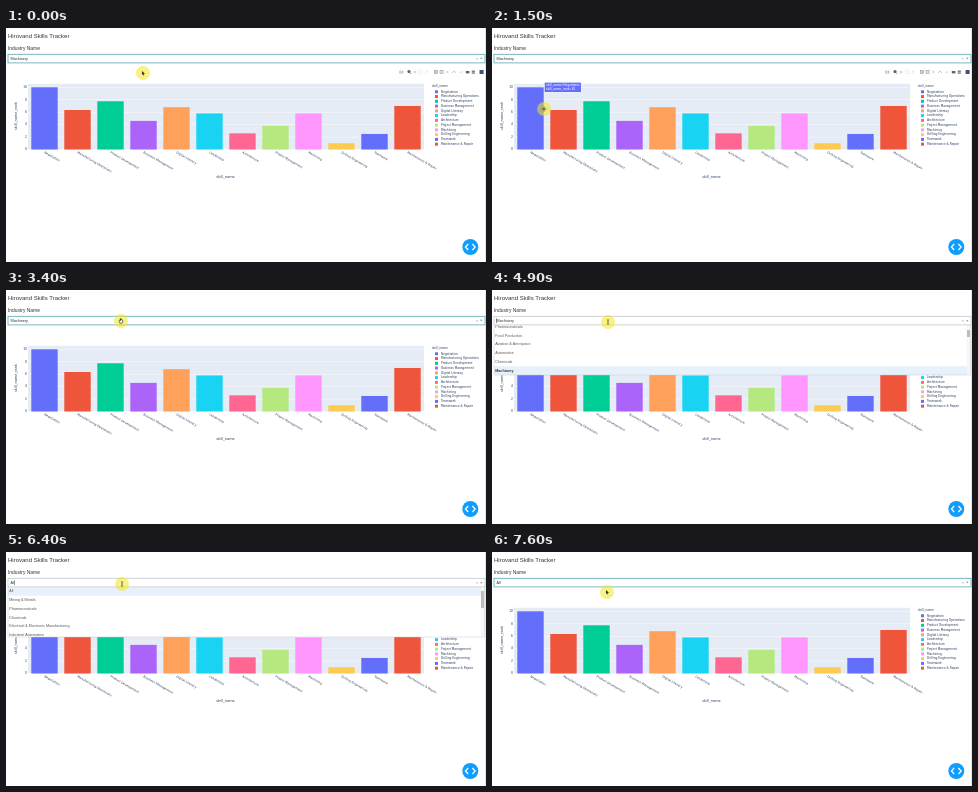
An HTML page with a canvas for the animation above (8 s loop, 480 px wide and 234 px high).

```html
<!DOCTYPE html>
<html lang="en">
<head>
<meta charset="utf-8">
<title>Skills Tracker</title>
<style>
html, body { margin: 0; width: 100%; height: 100%; overflow: hidden; background: #fff; }
canvas { display: block; width: 480px; height: 234px; }
</style>
</head>
<body>
<canvas></canvas>
<script>
const canvas = document.querySelector('canvas');
const g = canvas.getContext('2d');
const ratio = window.devicePixelRatio || 1;
canvas.width = 480 * ratio;
canvas.height = 234 * ratio;

const LOOP = 8000;
const UI = '"Liberation Sans", Arial, sans-serif';
const PLOT = '"DejaVu Sans", Verdana, sans-serif';
const INK = '#2a3f5f';
const COLORS = ['#636efa', '#ef553b', '#00cc96', '#ab63fa', '#ffa15a',
  '#19d3f3', '#ff6692', '#b6e880', '#ff97ff', '#fecb52'];
const SKILLS = [['Negotiation', 10], ['Manufacturing Operations', 6.35],
  ['Product Development', 7.75], ['Business Management', 4.6],
  ['Digital Literacy', 6.8], ['Leadership', 5.8], ['Architecture', 2.6],
  ['Project Management', 3.8], ['Machining', 5.8], ['Drilling Engineering', 1],
  ['Teamwork', 2.5], ['Maintenance & Repair', 7]];
const INDUSTRIES = ['All', 'Mining & Metals', 'Pharmaceuticals', 'Food Production',
  'Aviation & Aerospace', 'Automotive', 'Chemicals', 'Machinery',
  'Electrical & Electronic Manufacturing', 'Industrial Automation', 'Oil & Energy'];

// Pointer path: time, x, y
const PATH = [[0, 137, 45], [250, 128, 53], [550, 92, 70], [900, 56, 79], [1200, 49, 82],
  [1500, 52, 81], [1650, 58, 84], [1800, 73, 90], [2000, 84, 93], [2200, 97, 94],
  [2400, 100, 93], [2700, 104, 91], [2850, 107, 76], [3050, 112, 48], [3300, 115, 31],
  [3700, 115, 31], [4000, 116, 32], [6400, 116, 32], [6800, 117, 39], [7200, 117, 39.5],
  [7400, 115, 40], [8000, 115, 40]];
const OPEN = 3600, CLOSE = 7000;

const barLeft = i => 25.3 + 33 * i;
const BAR_W = 26.4;
const yOf = v => 121.5 - 6.22 * v;
const color = i => COLORS[i % COLORS.length];

function rect(x, y, w, h, fill) {
  g.fillStyle = fill;
  g.fillRect(x, y, w, h);
}

function line(points, stroke, width) {
  g.beginPath();
  points.forEach(([x, y]) => g.lineTo(x, y));
  g.strokeStyle = stroke;
  g.lineWidth = width;
  g.stroke();
}

function disc(x, y, r, fill) {
  g.beginPath();
  g.arc(x, y, r, 0, 7);
  g.fillStyle = fill;
  g.fill();
}

// Drawn enlarged and scaled down so that tiny glyphs keep exact widths
function text(str, x, y, size, { font = UI, fill = '#333', align = 'left', turn = 0, weight = '' } = {}) {
  g.save();
  g.translate(x, y);
  g.rotate(turn);
  g.scale(0.25, 0.25);
  g.font = `${weight} ${size * 4}px ${font}`;
  g.textAlign = align;
  g.textBaseline = 'middle';
  g.fillStyle = fill;
  g.fillText(str, 0, 0);
  const width = g.measureText(str).width / 4;
  g.restore();
  return width;
}

function pointer(t) {
  const i = Math.max(1, PATH.findIndex(p => p[0] > t));
  const [t0, x0, y0] = PATH[i - 1], [t1, x1, y1] = PATH[i];
  const u = (t - t0) / (t1 - t0);
  return [x0 + (x1 - x0) * u, y0 + (y1 - y0) * u];
}

function chart() {
  rect(22, 55.8, 396, 65.7, '#e5ecf6');
  for (let v = 0; v <= 10; v += 2) {
    rect(22, yOf(v) - 0.15, 396, 0.4, '#fff');
    text(v, 21, yOf(v), 3, { font: PLOT, fill: INK, align: 'right' });
  }
  text('skill_name', 426, 58.6, 3, { font: PLOT, fill: INK });
  SKILLS.forEach(([name, v], i) => {
    const y = 63.8 + 4.76 * i;
    rect(barLeft(i), yOf(v), BAR_W, 6.22 * v, color(i));
    text(name, barLeft(i) + BAR_W / 2, 124.3, 3, { font: PLOT, fill: INK, turn: Math.PI / 6 });
    rect(429, y - 1.5, 3, 3, color(i));
    text(name, 435, y, 2.9, { font: PLOT, fill: INK });
  });
  text('skill_name', 219.5, 149.5, 3.5, { font: PLOT, fill: INK, align: 'center' });
  text('skill_name_rank', 10, 88, 3.5, { font: PLOT, fill: INK, align: 'center', turn: -Math.PI / 2 });
}

function toolbar(alpha) {
  if (alpha <= 0) return;
  const y = 44;
  const box = (x, c) => { g.strokeStyle = c; g.lineWidth = 0.6; g.strokeRect(x - 1.5, y - 1.5, 3, 3); };
  const soft = '#b9bcc2', dark = '#5f646c';
  g.globalAlpha = alpha;
  rect(393.3, y - 1.3, 4, 2.8, soft);
  disc(395.3, y, 0.8, '#fff');
  disc(403, y - 0.4, 1.6, dark);
  line([[404, y + 0.6], [405.2, y + 1.8]], dark, 0.8);
  line([[407.5, y], [410.5, y]], soft, 0.7);
  line([[409, y - 1.5], [409, y + 1.5]], soft, 0.7);
  g.setLineDash([0.8, 0.5]);
  box(415, '#d5d7db');
  g.setLineDash([]);
  line([[420, y + 1.4], [421, y - 1.4], [422.6, y]], '#d5d7db', 0.6);
  [430, 435.5].forEach((x, i) => {
    box(x, '#8d929a');
    line([[x - 1, y], [x + 1, y]], '#8d929a', 0.6);
    if (!i) line([[x, y - 1], [x, y + 1]], '#8d929a', 0.6);
  });
  line([[440, y - 1.4], [442.5, y + 1.4]], soft, 0.6);
  line([[442.5, y - 1.4], [440, y + 1.4]], soft, 0.6);
  line([[446, y + 1], [448, y - 1.2], [450, y + 1]], soft, 0.8);
  line([[454, y + 1.2], [454, y], [457, y]], soft, 0.5);
  rect(459.8, y - 1, 3.6, 2.4, dark);
  rect(465.7, y - 1.4, 3.2, 1.2, dark);
  rect(465.7, y + 0.4, 3.2, 1.2, dark);
  rect(473.6, y - 2, 4, 4, '#3f4f75');
  g.globalAlpha = 1;
}

function tooltip(px, py) {
  const i = SKILLS.findIndex(([, v], k) =>
    px > barLeft(k) - 1 && px < barLeft(k) + BAR_W + 1 && py > yOf(v) && py < 121);
  if (i < 0) return;
  const [name, v] = SKILLS[i];
  const x = barLeft(i) + BAR_W + 0.8, y = yOf(v);
  const label = 'skill_name=' + name;
  g.font = `13px ${UI}`;
  const w = g.measureText(label).width / 4 + 3;
  rect(x, y - 4.9, w, 9.8, '#fff');
  rect(x + 0.2, y - 4.7, w - 0.4, 9.4, color(i));
  const fill = [0, 1, 3].includes(i) ? '#fff' : '#444';
  text(label, x + 1.5, y - 2, 3.25, { fill });
  text('skill_name_rank=' + Math.round(v), x + 1.5, y + 2, 3.25, { fill });
}

function menu(typed) {
  const row = 8.75, top = 35;
  const items = INDUSTRIES.filter(s => s.toLowerCase().includes(typed.toLowerCase()));
  const focus = typed ? 0 : items.indexOf('Machinery');
  const scroll = Math.max(0, (focus + 1) * row - 50);
  g.save();
  g.beginPath();
  g.rect(2, top, 476.5, 50);
  g.clip();
  rect(2, top, 476.5, 50, '#fff');
  items.forEach((name, i) => {
    const y = top + i * row - scroll;
    if (i === focus) rect(2, y, 476.5, row, '#e6f1fb');
    text(name, 3.2, y + row / 2 + 0.1, 3.7,
      name === 'Machinery' ? { weight: 'bold' } : { fill: '#555' });
  });
  rect(474.7, top, 3.6, 50, '#f6f6f6');
  rect(475, typed ? 39 : 40, 3, typed ? 17 : 7, '#bdbdbd');
  g.restore();
  line([[2, top], [2, 85], [478.6, 85], [478.6, top]], '#c8c8c8', 0.5);
}

function field(t, open, typed) {
  rect(2, 26.3, 477, 8.8, '#fff');
  g.strokeStyle = open ? '#c4c8cb' : '#58a8b4';
  g.lineWidth = 0.8;
  g.strokeRect(2, 26.3, 477, 8.6);
  const value = typed || (t < CLOSE ? 'Machinery' : 'All');
  const w = text(value, 4.5, 30.7, 3.8);
  if (open && (t + 600) % 1000 < 550) rect(typed ? 4.7 + w : 4.2, 28.3, 0.5, 4.8, '#222');
  text('×', 471, 30.5, 4, { fill: '#888', align: 'center' });
  g.beginPath();
  const tip = open ? -1 : 1;
  [[474, -0.7], [476.6, -0.7], [475.3, 0.8]].forEach(([x, y]) => g.lineTo(x, 30.5 + y * tip));
  g.fillStyle = '#888';
  g.fill();
}

function cursor(t, x, y) {
  disc(x, y, 7, 'rgba(242,230,30,.55)');
  if (t >= OPEN && t < 6500) {
    line([[x, y - 2.2], [x, y + 2.2]], '#333', 0.7);
    line([[x - 0.8, y - 2.2], [x + 0.8, y - 2.2]], '#333', 0.5);
    line([[x - 0.8, y + 2.2], [x + 0.8, y + 2.2]], '#333', 0.5);
  } else if (y > 55) {
    line([[x - 2.4, y], [x + 2.4, y]], '#333', 0.7);
    line([[x, y - 2.4], [x, y + 2.4]], '#333', 0.7);
  } else if (y < 36) {
    g.beginPath();
    g.ellipse(x, y + 0.3, 1.8, 2, 0, 0, 7);
    g.fillStyle = '#fff';
    g.fill();
    g.strokeStyle = '#333';
    g.lineWidth = 0.7;
    g.stroke();
    line([[x - 0.4, y - 2.8], [x - 0.4, y]], '#333', 0.8);
  } else {
    g.beginPath();
    [[-1, -2], [-1, 2], [0, 1.2], [0.7, 2.6], [1.3, 2.2], [0.7, 0.9], [2, 0.8]]
      .forEach(([dx, dy]) => g.lineTo(x + dx, y + dy));
    g.fillStyle = '#333';
    g.fill();
  }
}

function draw(t) {
  const open = t >= OPEN && t < CLOSE;
  const typed = !open || t < 5000 ? '' : t < 5200 ? 'A' : 'Al';
  const [x, y] = pointer(t);
  g.setTransform(ratio, 0, 0, ratio, 0, 0);
  rect(0, 0, 480, 234, '#fff');
  rect(479.4, 0, 0.6, 234, '#d8d8d8');
  text('Hirovand Skills Tracker', 2, 8.6, 6);
  text('Industry Name', 2, 20.2, 4.9);
  chart();
  toolbar(Math.min(1, (3250 - t) / 300));
  if (!open) tooltip(x, y);
  if (open) menu(typed);
  field(t, open, typed);
  disc(464.3, 219, 8, '#119dff');
  line([[462.2, 216], [459.4, 219], [462.2, 222]], '#fff', 1.2);
  line([[466.4, 216], [469.2, 219], [466.4, 222]], '#fff', 1.2);
  cursor(t, x, y);
}

const start = performance.now();
function tick() {
  draw((performance.now() - start) % LOOP);
  requestAnimationFrame(tick);
}
tick();
</script>
</body>
</html>
```
